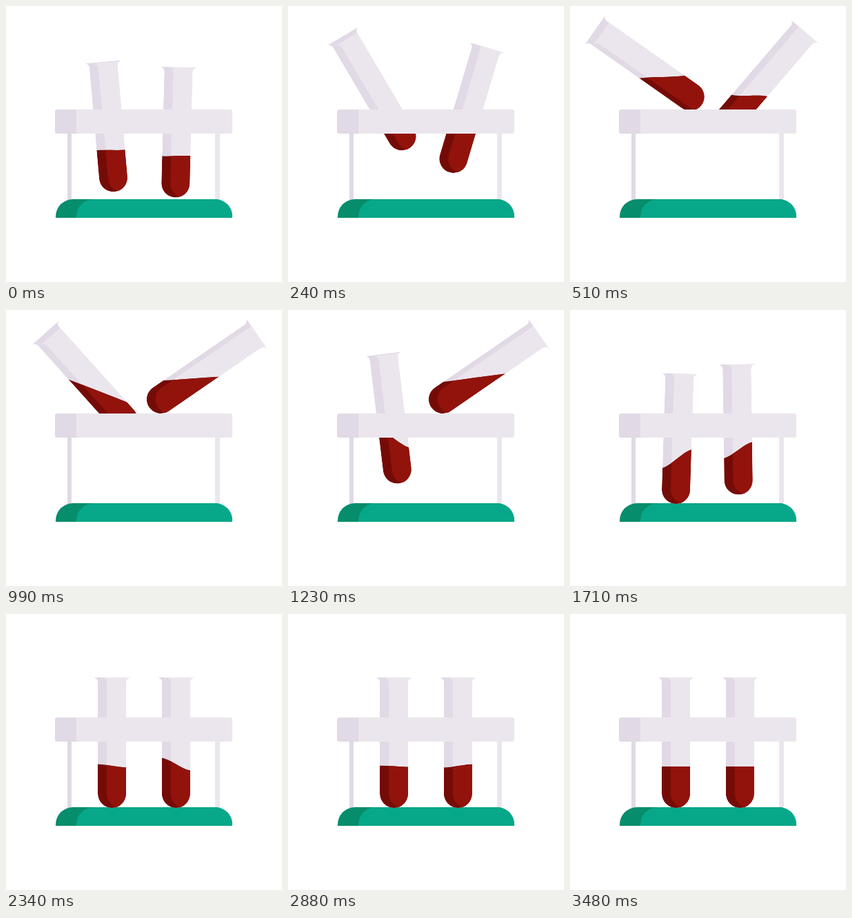
Animation of 400 by 400 pixels, one loop 5630 ms. Source, as an HTML page:

```html
<!DOCTYPE html>
<html lang="en">
<head>
<meta charset="utf-8">
<title>Test tubes</title>
<style>
html, body { margin: 0; width: 100%; height: 100%; overflow: hidden; background: #fff; }
svg { display: block; width: 100%; height: 100%; }
.glass { fill: #ebe6ed; }
.shade { fill: #e1d9e5; }
.blood { fill: #92130c; }
.dark { fill: #750b06; }
</style>
</head>
<body>
<svg viewBox="0 0 400 400">
  <defs>
    <!-- origin at the centre of the round bottom -->
    <path id="tube" d="M-26.5-168.5H26.5Q20.5-167 20.5-161V0A20.5 20.5 0 0 1-20.5 0V-161Q-20.5-167-26.5-168.5Z"/>
    <clipPath id="inside"><use href="#tube"/></clipPath>
    <path id="base" d="M72 307V305A25 25 0 0 1 97 280H303A25 25 0 0 1 328 305V307Z"/>
    <clipPath id="floor"><use href="#base"/></clipPath>
  </defs>
  <path class="shade" d="M89 180h6v101h-6z"/>
  <path class="glass" d="M303 180h7v101h-7z"/>
  <use href="#base" fill="#058d6c"/>
  <g clip-path="url(#floor)"><use href="#base" x="30" fill="#07a88a"/></g>
  <g id="tubes"></g>
  <rect class="shade" x="71" y="150" width="60" height="35" rx="3.5"/>
  <path class="glass" d="M102 150H324.5Q328 150 328 153.5V181.5Q328 185 324.5 185H102Z"/>
</svg>
<script>
const LOOP = 5630, STEP = 30, REST = 3480, SHADE = 13;

const tubes = [
  { x: 153.5, dx: 21, dy: -131.5, tilt: -56, rise: [-128, 566], fall: [802, 1419], wave: 86, crest: 970 },
  { x: 246.3, dx: -22, dy: -131, tilt: 55.5, rise: [-87, 817], fall: [1305, 1810], wave: -87, crest: 1410 }
];

const holder = document.getElementById('tubes');
tubes.forEach((tube, i) => {
  const layers = (back, front) =>
    `<use href="#tube" class="${back}"/><use href="#tube" class="${front} lit"/>`;
  holder.insertAdjacentHTML('beforeend', `<g>
    <clipPath id="level${i}"><path/></clipPath>
    <g clip-path="url(#inside)">${layers('shade', 'glass')}
      <g clip-path="url(#level${i})">${layers('dark', 'blood')}</g>
    </g></g>`);
  tube.el = holder.lastElementChild;
  tube.level = tube.el.querySelector('clipPath path');
  tube.lit = tube.el.querySelectorAll('.lit');
});

function ease(t, [from, to]) {
  const p = Math.min(Math.max((t - from) / (to - from), 0), 1);
  return p * p * (3 - 2 * p);
}

// Height difference across the surface: builds up, then swings and dies away.
function slosh(tube, t) {
  const late = t - tube.crest;
  const swing = late < 0
    ? ease(t, [-128, tube.crest])
    : Math.exp(-late / 750) * Math.cos(Math.PI * late / 830);
  return tube.wave * swing * (1 - (t / REST) ** 4);
}

function surface(s) {
  const mid = -39.5 - 0.19 * Math.abs(s);
  const bend = s / 2 * (0.34 + 0.5 * Math.exp(-s * s / 1600));
  return `M-21 ${mid - s / 2}C-7 ${mid - bend} 7 ${mid + bend} 21 ${mid + s / 2}V21H-21Z`;
}

function draw(now) {
  const t = Math.min(Math.floor(now % LOOP / STEP) * STEP, REST);
  for (const tube of tubes) {
    const back = ease(t, tube.fall), end = tube.fall[1];
    const up = ease(t, tube.rise) - back;
    const over = 0.13 * (back - ease(t, [end, end + 430]));
    const angle = tube.tilt * (up - over), a = angle * Math.PI / 180;
    tube.el.setAttribute('transform',
      `translate(${tube.x + tube.dx * up} ${260.5 + tube.dy * up}) rotate(${angle})`);
    tube.level.setAttribute('d', surface(slosh(tube, t)));
    // The lit side is always shifted straight to the right on screen.
    for (const el of tube.lit)
      el.setAttribute('transform', `translate(${SHADE * Math.cos(a)} ${-SHADE * Math.sin(a)})`);
  }
}

const start = performance.now();
function frame() {
  draw(performance.now() - start);
  requestAnimationFrame(frame);
}
frame();
</script>
</body>
</html>
```
